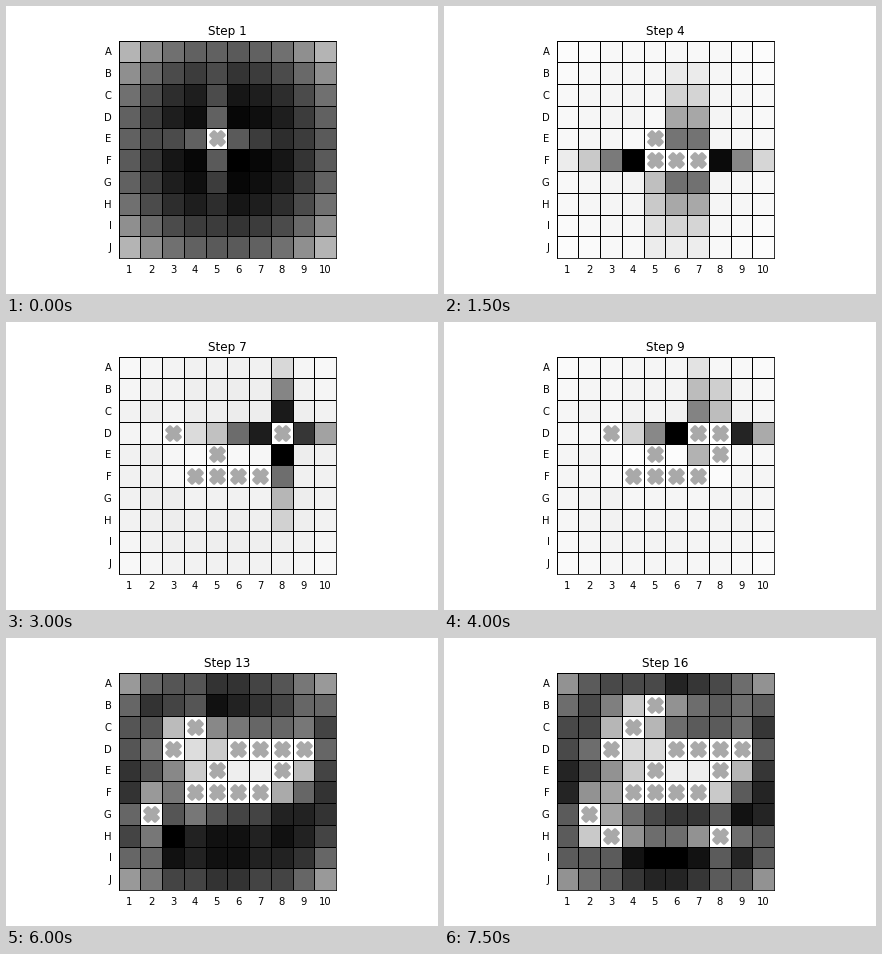
A matplotlib script for the animation above (8 s loop, 432 by 288 pixels).

```python
import numpy as np
import matplotlib.pyplot as plt
from matplotlib.animation import FuncAnimation

N = 10
STEPS = 16
HIT_WEIGHT = 30
ROWS = "ABCDEFGHIJ"


def line(row, col, size, down=False):
    return [(row + i, col) if down else (row, col + i) for i in range(size)]


def placements(size):
    for a in range(N):
        for b in range(N - size + 1):
            yield line(a, b, size)
            yield line(b, a, size, down=True)


def density(ships, blocked, hits, shots):
    """Count how many ship placements cover each untried cell."""
    heat = np.zeros((N, N), int)
    for ship in ships:
        for cells in placements(len(ship)):
            if blocked.isdisjoint(cells):
                weight = max(1, HIT_WEIGHT * len(hits.intersection(cells)))
                for cell in cells:
                    heat[cell] += weight
    for cell in shots:
        heat[cell] = 0
    return heat


def play():
    ships = [line(0, 5, 5), line(5, 3, 4), line(3, 6, 3),
             line(8, 3, 3), line(1, 8, 2)]
    blocked, hits, shots = set(), set(), []
    heat = density(ships, blocked, hits, shots)
    history = []
    for _ in range(STEPS):
        row, col = divmod(int(heat.argmax()), N)
        shot = (row, col)
        shots.append(shot)
        ship = next((s for s in ships if shot in s), None)
        if ship is None:
            blocked.add(shot)
        else:
            hits.add(shot)
            if hits.issuperset(ship):
                ships.remove(ship)
                hits.difference_update(ship)
                blocked.update(ship)
        heat = density(ships, blocked, hits, shots)
        history.append((heat, [(c + 0.5, r + 0.5) for r, c in shots]))
    return history


history = play()

plt.rcParams.update({"font.family": "DejaVu Sans", "font.size": 10})
fig, ax = plt.subplots(figsize=(6, 4), dpi=72)
fig.subplots_adjust(left=0.125, right=0.9, bottom=0.125, top=0.88)

mesh = ax.pcolormesh(history[0][0], cmap="binary", edgecolors="k",
                     linewidth=1, antialiased=True, snap=True)
marks = ax.scatter([], [], s=190, marker="X", color="darkgray",
                   linewidths=3, zorder=3)
title = ax.set_title("Step 1", fontsize=12)

ax.set_aspect("equal")
ax.set_xlim(0, N)
ax.set_ylim(N, 0)
ax.set_xticks(np.arange(N) + 0.5, range(1, N + 1))
ax.set_yticks(np.arange(N) + 0.5, ROWS)
ax.tick_params(length=0, pad=7)


def update(i):
    heat, points = history[i]
    mesh.set_array(heat)
    mesh.set_clim(0, heat.max())
    marks.set_offsets(points)
    title.set_text(f"Step {i + 1}")
    return mesh, marks, title


anim = FuncAnimation(fig, update, frames=STEPS, interval=500, repeat=True,
                     repeat_delay=0, blit=False)
plt.show()
```
